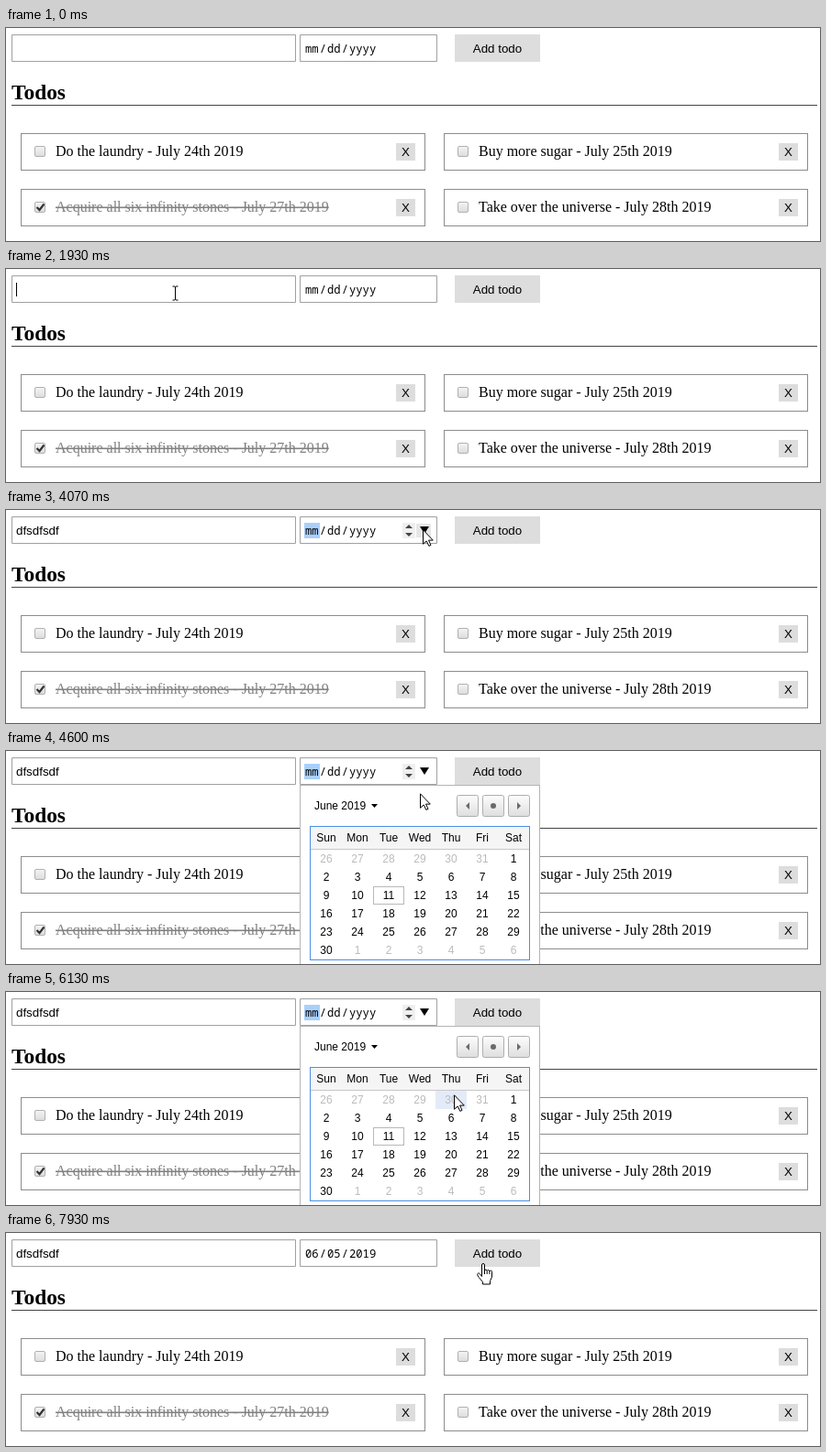
Animation, 887 px wide and 233 px high, one loop 8000 ms. Source, as an HTML page:

```html
<!DOCTYPE html>
<html lang="en">
<head>
<meta charset="utf-8">
<title>Todos</title>
<style>
html, body { margin: 0; width: 100%; height: 100%; overflow: hidden; background: #fff; }
svg { display: block; }
text { white-space: pre; }
.ui { font: 13.333px "Liberation Sans", Arial, sans-serif; }
.cal { font: 12px "Liberation Sans", Arial, sans-serif; }
.item { font: 16px "Liberation Serif", "Times New Roman", serif; }
.head { font: bold 23.4px "Liberation Serif", "Times New Roman", serif; }
.date { font: 12.2px "Noto Sans Mono", "DejaVu Sans Mono", monospace; }
.mid { text-anchor: middle; }
.done { fill: #808080; text-decoration: line-through; }
</style>
</head>
<body>
<svg id="stage" width="887" height="233" viewBox="0 0 887 233">
  <defs>
    <linearGradient id="box" x2="0" y2="1"><stop stop-color="#f4f4f4"/><stop offset="1" stop-color="#dcdcdc"/></linearGradient>
    <linearGradient id="nav" x2="0" y2="1"><stop stop-color="#fdfdfd"/><stop offset="1" stop-color="#dedede"/></linearGradient>
  </defs>
  <g fill="#fff" stroke="#a0a0a0">
    <path d="M6.5 7.5h309v29h-309zM320.5 7.5h149v29h-149z"/>
  </g>
  <text id="typed" class="ui" x="11" y="27"></text>
  <rect id="caret" y="15" width="1" height="15"/>
  <rect id="mark" x="325" y="14" width="17" height="17" fill="#a9d0fb"/>
  <g class="date">
    <text id="mm" x="326" y="27"></text><text x="341.7" y="27">/</text>
    <text id="dd" x="350" y="27"></text><text x="365.7" y="27">/</text>
    <text id="yyyy" x="374" y="27"></text>
  </g>
  <path id="clear" d="M422 20l7 7m0-7l-7 7" stroke="#3f5f9f" stroke-width="2.2"/>
  <rect id="pickHover" x="447" y="15" width="16" height="15" fill="#e6e6e6"/>
  <g id="spin">
    <rect x="432" y="14" width="14" height="17" fill="#efefef"/>
    <path d="M435 20l4-4 4 4zM435 25l4 4 4-4z" fill="#444"/>
    <path d="M451 18h10l-5 8z"/>
  </g>
  <rect x="489" y="7" width="93" height="30" fill="#ddd"/>
  <text class="ui mid" x="535.5" y="27">Add todo</text>
  <text class="head" x="6" y="78">Todos</text>
  <rect x="6" y="84" width="878" height="1" fill="#444"/>
  <g id="cards"></g>
  <g id="popup">
    <rect x="320.5" y="37.5" width="261" height="220" fill="#fff" stroke="#b4b4b4"/>
    <text class="cal" x="336" y="64">June 2019</text>
    <path d="M398 58h7l-3.5 4z"/>
    <g fill="url(#nav)" stroke="#adadad">
      <rect x="491.5" y="48.5" width="23" height="23" rx="2"/>
      <rect x="519.5" y="48.5" width="23" height="23" rx="2"/>
      <rect x="547.5" y="48.5" width="23" height="23" rx="2"/>
    </g>
    <path d="M505 56v8l-4-4zM557 56v8l4-4zM528 60a3 3 0 0 1 6 0a3 3 0 0 1-6 0" fill="#6a6a6a"/>
    <rect x="332" y="83" width="239" height="24" fill="#f5f5f5"/>
    <rect x="332" y="107" width="239" height="1" fill="#c8c8c8"/>
    <rect id="hover" width="34" height="20" fill="#e4ebf8"/>
    <rect x="400.5" y="148.5" width="33" height="19" fill="none" stroke="#b8b8b8"/>
    <g id="days" class="cal mid"></g>
    <rect x="331.5" y="82.5" width="239" height="146" fill="none" stroke="#4a90e2"/>
  </g>
  <g id="cursor">
    <path id="arrow" d="M.5 .8V16.3L4.2 12.9L6.8 18.4L9 17.4L6.5 12.1H11.3Z" fill="#fff" stroke="#000"/>
    <path id="beam" d="M-3-7.5h2.5l.5 .5 .5-.5H3M-3 7.5h2.5L0 7l.5 .5H3M0-7V7" fill="none" stroke="#000" transform="translate(.5 .5)"/>
    <g id="hand" transform="translate(-5 -1)" stroke="#000">
      <path d="M5.5 14.5V2a1.5 1.5 0 0 1 3 0V8a1.4 1.4 0 0 1 2.7 .4a1.4 1.4 0 0 1 2.7 .6a1.3 1.3 0 0 1 2.6 .8V15l-2 4.5V23H6.5V20.5L2.2 15.5L.7 12.8C.4 11 2.2 10.4 3.3 11.6Z" fill="#fff"/>
      <path d="M8.5 8v4M11.2 8.4V12M13.9 9v3" fill="none"/>
    </g>
  </g>
</svg>
<script>
const $ = id => document.getElementById(id);
const show = (id, on) => $(id).setAttribute('display', on ? 'inline' : 'none');

const card = (x, y, w, label, done) => `
  <rect x="${x + .5}" y="${y + .5}" width="${w}" height="40" fill="#fff" stroke="#8c8c8c"/>
  <rect x="${x + 15.5}" y="${y + 14.5}" width="11" height="11" rx="1.5" fill="url(#box)" stroke="#b0b0b0"/>
  ${done ? `<path d="M${x + 17.5} ${y + 20}l3 3 5-6.5" fill="none" stroke="#333" stroke-width="2.2"/>` : ''}
  <text class="item${done ? ' done' : ''}" x="${x + 38}" y="${y + 25}">${label}</text>
  <rect x="${x + w - 31}" y="${y + 11}" width="21" height="19" fill="#ddd"/>
  <text class="ui mid" x="${x + w - 20.5}" y="${y + 25}">X</text>`;
$('cards').innerHTML =
  card(16, 115, 440, 'Do the laundry - July 24th 2019') +
  card(477, 115, 396, 'Buy more sugar - July 25th 2019') +
  card(16, 176, 440, 'Acquire all six infinity stones - July 27th 2019', true) +
  card(477, 176, 396, 'Take over the universe - July 28th 2019');

const cell = (label, col, y, fill) => `<text x="${349 + 34 * col}" y="${y}" fill="${fill}">${label}</text>`;
let days = ['Sun', 'Mon', 'Tue', 'Wed', 'Thu', 'Fri', 'Sat'].map((d, i) => cell(d, i, 99, '#000')).join('');
for (let i = 0; i < 42; i++) {
  const inMonth = i > 5 && i < 36;
  const day = i < 6 ? 26 + i : inMonth ? i - 5 : i - 35;
  days += cell(day, i % 7, 122 + 20 * Math.floor(i / 7), inMonth ? '#000' : '#bbb');
}
$('days').innerHTML = days;

// Pointer stops: [tick, x, y], 15 ticks a second
const stops = [
  [14, 865, 132], [26, 186, 30], [27, 185, 28], [29, 184, 26], [44, 184, 26],
  [48, 493, 62], [51, 467, 29], [55, 467, 29], [56, 466, 29], [57, 466, 29],
  [61, 454, 21], [64, 454, 21], [69, 451, 46], [77, 445, 153], [79, 465, 154],
  [81, 465, 154], [82, 473, 154], [88, 583, 50], [94, 455, 134], [99, 454, 132],
  [103, 454, 132], [110, 513, 55], [114, 513, 55], [119, 518, 34], [120, 518, 34]
];

function pointer(n) {
  const i = Math.max(1, stops.findIndex(s => s[0] > n));
  const [n0, x0, y0] = stops[i - 1], [n1, x1, y1] = stops[i];
  const u = Math.min(1, Math.max(0, (n - n0) / (n1 - n0)));
  const k = u * u * (3 - 2 * u);
  return [Math.round(x0 + (x1 - x0) * k), Math.round(y0 + (y1 - y0) * k)];
}

function draw(now) {
  const n = Math.floor((now % 8000 + 5) * 15 / 1000) % 120;
  const between = (a, b) => n >= a && n < b;
  const [x, y] = pointer(n);

  $('typed').textContent = 'dfsdfsdf'.slice(0, Math.max(0, n - 39));
  show('caret', between(29, 37) || between(40, 49));
  $('caret').setAttribute('x', 11 + Math.round($('typed').getComputedTextLength()));

  const chosen = n >= 95;
  $('mm').textContent = chosen ? '06' : 'mm';
  $('dd').textContent = chosen ? '05' : 'dd';
  $('yyyy').textContent = chosen ? '2019' : 'yyyy';
  show('mark', between(49, 112));
  show('spin', between(49, 112));
  show('clear', between(95, 112));
  show('pickHover', between(59, 65));

  show('popup', between(65, 96));
  const col = Math.floor((x - 332) / 34), row = Math.floor((y - 108) / 20);
  show('hover', between(65, 96) && col >= 0 && col < 7 && row >= 0 && row < 6);
  $('hover').setAttribute('x', 332 + 34 * col);
  $('hover').setAttribute('y', 108 + 20 * row);

  const inRow = y >= 7 && y < 37;
  const beam = inRow && x < 316, hand = inRow && x >= 489 && x < 582;
  show('cursor', n >= 14);
  show('beam', beam);
  show('hand', hand);
  show('arrow', !beam && !hand);
  $('cursor').setAttribute('transform', `translate(${x} ${y})`);
  requestAnimationFrame(draw);
}
requestAnimationFrame(draw);
</script>
</body>
</html>
```
